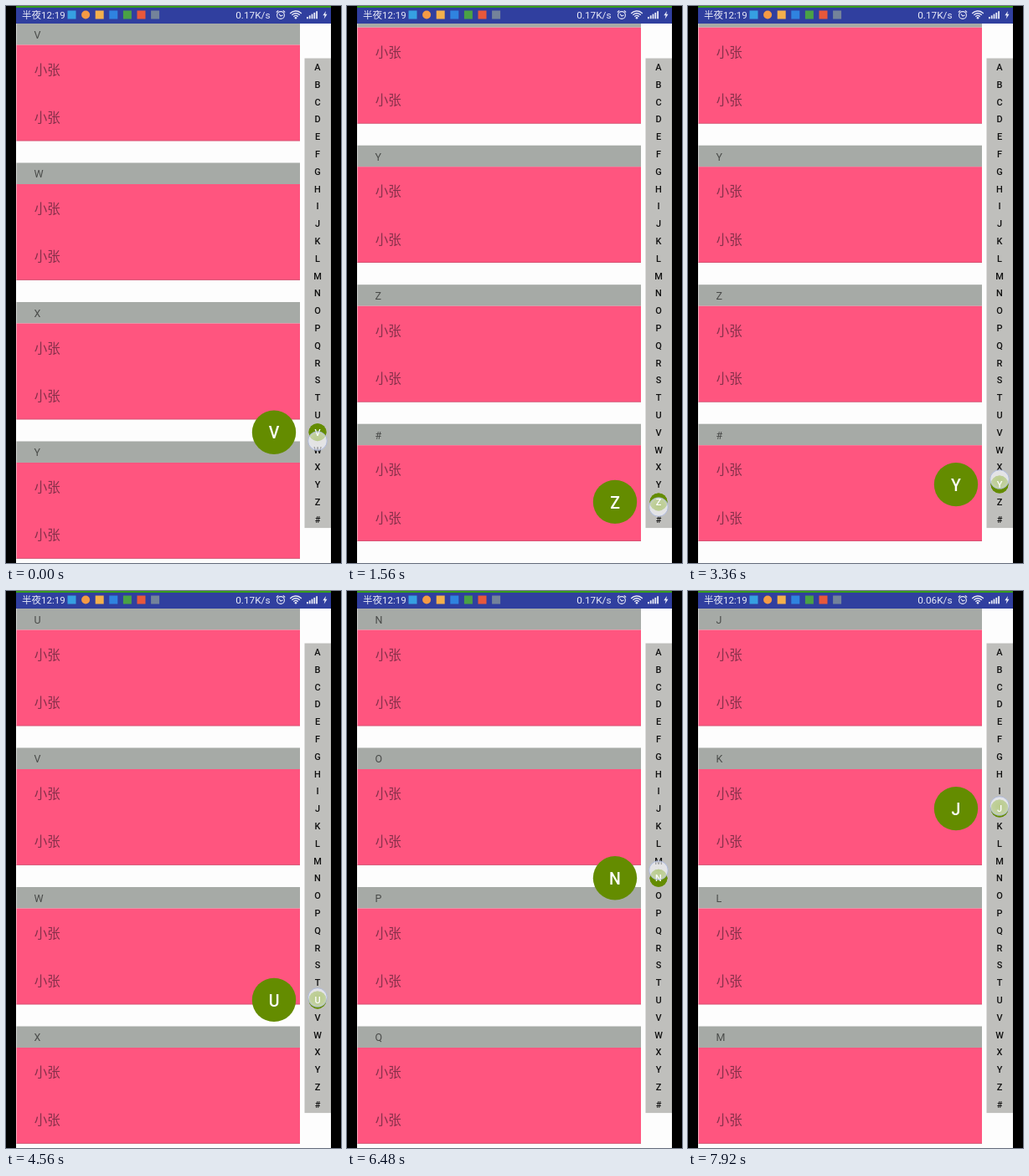
Recreate the animation shown at these times as an HTML page with a canvas. Size 400 by 666 pixels, loop 8 s.

```html
<!DOCTYPE html>
<html lang="zh">
<head>
<meta charset="utf-8">
<style>
  html, body { margin: 0; width: 100%; height: 100%; overflow: hidden; background: #000; }
  canvas { display: block; }
</style>
</head>
<body>
<canvas id="stage" width="400" height="666"></canvas>
<script>
const ctx = document.getElementById('stage').getContext('2d');
const LETTERS = 'ABCDEFGHIJKLMNOPQRSTUVWXYZ#';
const LOOP = 8000, STEP = 120;
const TOP = 21, SECTION = 166.5, HEADER = 25.5, ROW = 57.4;
const BAR_TOP = 62.5, CELL = 20.8;
const GREEN = '#648c00';
const FONT = 'Roboto, "Noto Sans CJK SC", "Noto Sans CJK", sans-serif';
const MAX_SCROLL = 23 * SECTION + 20.8;

// Finger height over time: [ms, y]
const PATH = [[0, 520], [720, 560], [840, 570], [1560, 599], [2400, 612],
  [3360, 566], [4560, 486], [6480, 334], [7920, 257]];

function fingerY(t) {
  const i = Math.max(1, PATH.findIndex(p => p[0] >= t));
  const [t0, y0] = PATH[i - 1], [t1, y1] = PATH[i];
  return y0 + (y1 - y0) * (t - t0) / (t1 - t0);
}
const letterAt = t => Math.floor((fingerY(t) - BAR_TOP) / CELL);
const cellY = i => BAR_TOP + CELL * (i + 0.5);

function rect(x, y, w, h, color) {
  ctx.fillStyle = color;
  ctx.fillRect(x, y, w, h);
}
function disc(x, y, r, color) {
  ctx.fillStyle = color;
  ctx.beginPath();
  ctx.arc(x, y, r, 0, Math.PI * 2);
  ctx.fill();
}
function arc(x, y, r, from = 0, to = Math.PI * 2) {
  ctx.beginPath();
  ctx.arc(x, y, r, from, to);
  ctx.stroke();
}
function text(str, x, y, size, color, align = 'center', weight = 400) {
  ctx.font = `${weight} ${size}px ${FONT}`;
  ctx.textAlign = align;
  ctx.textBaseline = 'alphabetic';
  ctx.fillStyle = color;
  ctx.fillText(str, x, y + size * 0.36);
}
function polygon(points, color) {
  ctx.fillStyle = color;
  ctx.beginPath();
  points.forEach(([x, y]) => ctx.lineTo(x, y));
  ctx.fill();
}

function drawStatusBar(t) {
  const ink = '#e9ebf8';
  rect(12, 0, 376, TOP, '#303f9f');
  rect(12, 0, 376, 2, '#359b1c');
  text('半夜12:19', 19, 10.7, 11.5, ink, 'left');
  ['#36a0e2', '#f49a45', '#f3b04c', '#2f83e0', '#4aa245', '#e8583b', '#74839a']
    .forEach((color, i) => {
      const x = 78.5 + i * 16.6;
      if (i === 1) disc(x, 10.5, 5, color);
      else rect(x - 5, 5.5, 10, 10, color);
    });
  text(t < 7080 ? '0.17K/s' : '0.06K/s', 315.5, 10.7, 11.8, ink, 'right');

  ctx.strokeStyle = ink;
  ctx.lineWidth = 1.1;
  arc(328, 11, 4.4);
  ctx.beginPath();
  ctx.moveTo(326, 9.5); ctx.lineTo(328, 12); ctx.lineTo(330.5, 11);
  ctx.moveTo(322.8, 7.5); ctx.lineTo(325.2, 5.3);
  ctx.moveTo(333.2, 7.5); ctx.lineTo(330.8, 5.3);
  ctx.stroke();
  ctx.lineWidth = 1.4;
  for (const r of [3.5, 6.2, 9]) arc(346, 15, r, -Math.PI * 0.77, -Math.PI * 0.23);
  disc(346, 14.3, 1.3, ink);
  for (let i = 0; i < 5; i++) rect(359 + i * 2.8, 13 - i * 1.7, 1.8, 2.3 + i * 1.7, ink);
  polygon([[382, 6], [378.3, 11.3], [380.6, 11.3], [379.7, 15.5], [383.5, 9.8], [381.2, 9.8]], ink);
}

function drawList(top) {
  const scroll = Math.min(top * SECTION, MAX_SCROLL);
  ctx.save();
  ctx.beginPath();
  ctx.rect(12, TOP, 376, 666 - TOP);
  ctx.clip();
  [...LETTERS].forEach((letter, i) => {
    const y = TOP + i * SECTION - scroll;
    if (y < -SECTION || y > 666) return;
    rect(12.5, y, 338.5, HEADER, '#a6aaa6');
    text(letter, 33.5, y + 13.3, 12.5, '#494b49', 'left');
    rect(12.5, y + HEADER, 338.5, ROW * 2, '#ff557f');
    rect(12.5, y + HEADER + ROW * 2 - 0.6, 338.5, 0.6, '#b9506b');
    for (const row of [0, 1])
      text('小张', 33.8, y + 55 + row * ROW, 15.5, '#85304a', 'left', 300);
  });
  ctx.restore();
}

function drawSidebar(active) {
  rect(356.5, BAR_TOP, 31.5, CELL * 27, '#bfbfbc');
  active.forEach(i => disc(372, cellY(i), 10.5, GREEN));
  [...LETTERS].forEach((letter, i) => {
    const on = active.includes(i);
    text(letter, 372, cellY(i) + 0.2, 11, on ? '#fff' : '#111', 'center', 500);
  });
}

function drawFinger(y) {
  const glow = ctx.createRadialGradient(372, y, 0, 372, y, 11.5);
  glow.addColorStop(0, 'rgba(255,255,255,.55)');
  glow.addColorStop(0.75, 'rgba(250,250,255,.62)');
  glow.addColorStop(1, 'rgba(235,238,255,.75)');
  disc(372, y, 11.5, glow);
  ctx.strokeStyle = 'rgba(150,165,205,.65)';
  ctx.lineWidth = 1;
  arc(372, y, 11.3);
}

function draw(t) {
  const current = letterAt(t);
  const previous = letterAt(Math.max(0, t - STEP)); // the list trails by one step
  rect(0, 0, 400, 666, '#000');
  rect(12, 0, 376, 666, '#fdfdfd');
  drawList(previous);
  drawStatusBar(t);
  drawSidebar([previous, current]);
  disc(320, cellY(current), 26.2, GREEN);
  text(LETTERS[current], 320, cellY(current) + 0.6, 19.5, '#fff', 'center', 500);
  drawFinger(fingerY(t));
}

const start = performance.now();
function tick() {
  const t = (performance.now() - start) % LOOP;
  draw(Math.floor(t / STEP) * STEP);
  requestAnimationFrame(tick);
}
tick();
</script>
</body>
</html>
```
